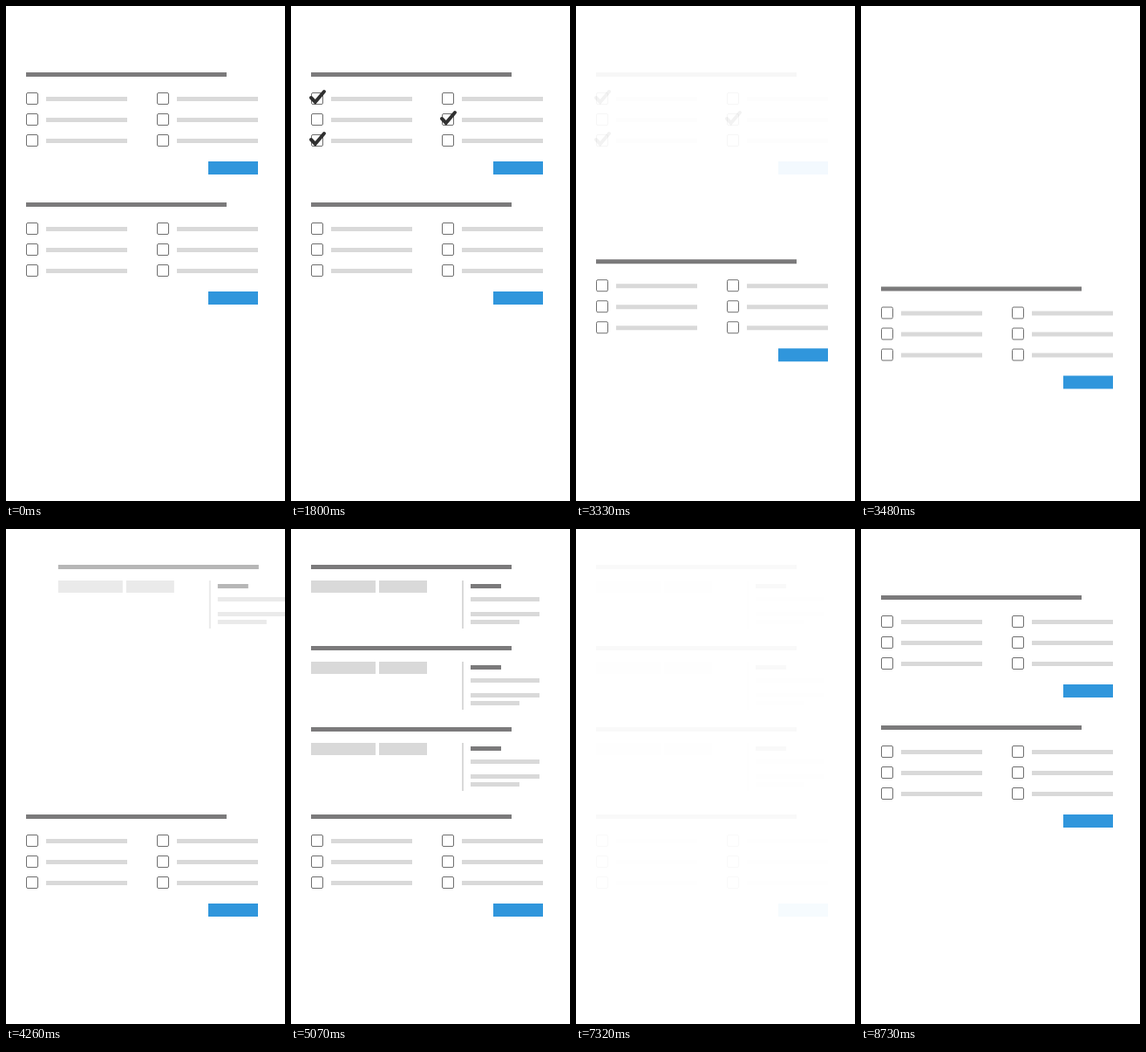
An HTML page with a canvas that plays this animation: 320x567 px, repeating every 9.03 s.

```html
<!DOCTYPE html>
<html lang="en">
<head>
<meta charset="utf-8">
<title>Form to cards</title>
<style>
  html, body { margin: 0; width: 100%; height: 100%; overflow: hidden; background: #fff; }
  canvas { display: block; width: 100vw; height: 100vh; }
</style>
</head>
<body>
<canvas id="stage" width="320" height="567"></canvas>
<script>
const ctx = document.getElementById('stage').getContext('2d');
const LOOP = 9030, STEP = 30;
const DARK = '#7b7a7b', LIGHT = '#d9d9d9', BLUE = '#3096dc', INK = '#303030';
const CHECKS = [[30, 105], [180, 129], [30, 153]];

const progress = (t, start, end) => Math.min(1, Math.max(0, (t - start) / (end - start)));
const cubic = (a, b, s) => 3 * (1 - s) ** 2 * s * a + 3 * (1 - s) * s * s * b + s ** 3;

// cubic-bezier(.5, 0, .45, 1)
function ease(x) {
  let low = 0, high = 1;
  for (let i = 0; i < 20; i++) {
    const mid = (low + high) / 2;
    if (cubic(0.5, 0.45, mid) < x) low = mid; else high = mid;
  }
  return cubic(0, 1, (low + high) / 2);
}
const eased = (t, start, end) => ease(progress(t, start, end));
const backOut = p => 1 + 2.7 * (p - 1) ** 3 + 1.7 * (p - 1) ** 2;

function bar(x, y, width, height, color) {
  ctx.fillStyle = color;
  ctx.fillRect(x, y, width, height);
}

function group(alpha, dx, dy, draw) {
  if (alpha <= 0) return;
  ctx.save();
  ctx.globalAlpha = alpha;
  ctx.translate(dx, dy);
  draw();
  ctx.restore();
}

function form() {
  bar(23, 76, 230, 5, DARK);
  for (const x of [23, 173]) {
    for (const y of [99, 123, 147]) {
      ctx.strokeStyle = '#6e6e6e';
      ctx.lineWidth = 1;
      ctx.beginPath();
      ctx.roundRect(x + 0.5, y + 0.5, 13, 13, 1.5);
      ctx.stroke();
      bar(x + 23, y + 5, 93, 5, LIGHT);
    }
  }
  bar(232, 178, 57, 15, BLUE);
}

function check([x, y], scale) {
  if (scale <= 0) return;
  ctx.save();
  ctx.translate(x, y);
  ctx.scale(scale, scale);
  ctx.strokeStyle = INK;
  ctx.lineWidth = 4;
  ctx.lineCap = 'round';
  ctx.beginPath();
  ctx.moveTo(-7, 0);
  ctx.lineTo(-2.2, 5);
  ctx.lineTo(8, -7);
  ctx.stroke();
  ctx.restore();
}

function press(t) {
  if (t < 2520) return;
  const alpha = ctx.globalAlpha;
  ctx.globalAlpha = alpha * 0.58 * progress(t, 2490, 2910);
  bar(232, 178, 57, 15, '#fff');

  const p = progress(t, 2490, 3150);
  ctx.beginPath();
  ctx.arc(261, 187, 20 * p, 0, 2 * Math.PI);
  ctx.globalAlpha = alpha * 0.35 * (1 - p);
  ctx.fillStyle = '#fff';
  ctx.fill();
  ctx.globalAlpha = alpha * 0.25;
  ctx.strokeStyle = '#f0f0f0';
  ctx.lineWidth = 1;
  ctx.stroke();
  ctx.globalAlpha = alpha;
}

function card() {
  bar(23, 41, 230, 5, DARK);
  bar(23, 59, 74, 14, LIGHT);
  bar(101, 59, 55, 14, LIGHT);
  bar(196, 59, 2, 55, LIGHT);
  bar(206, 63, 35, 5, DARK);
  bar(206, 78, 79, 5, LIGHT);
  bar(206, 95, 79, 5, LIGHT);
  bar(206, 104, 56, 5, LIGHT);
}

function render(t) {
  ctx.clearRect(0, 0, 320, 567);

  // The opening state returns at the end of the loop.
  if (t >= 8520) {
    const alpha = eased(t, 8490, 8730);
    for (const dy of [0, 149]) group(alpha, 0, dy, form);
    return;
  }

  group(1 - eased(t, 3000, 3420), 0, 0, () => {
    form();
    CHECKS.forEach((spot, i) => {
      const start = 900 + 300 * i;
      check(spot, backOut(progress(t, start, start + 300)));
    });
    press(t);
  });

  // A faint trace of the cards stays after the fade.
  const remaining = 1 - 0.955 * eased(t, 6990, 7320);
  group(remaining, 0, 149 + 102 * eased(t, 3000, 3600), form);
  for (let i = 0; i < 3; i++) {
    const start = 4110 + 330 * i;
    const p = eased(t, start, start + 300);
    group(p * remaining, 80 * (1 - p), 93 * i, card);
  }
}

function tick() {
  const t = performance.now() % LOOP;
  render(t - t % STEP);
  requestAnimationFrame(tick);
}
tick();
</script>
</body>
</html>
```
